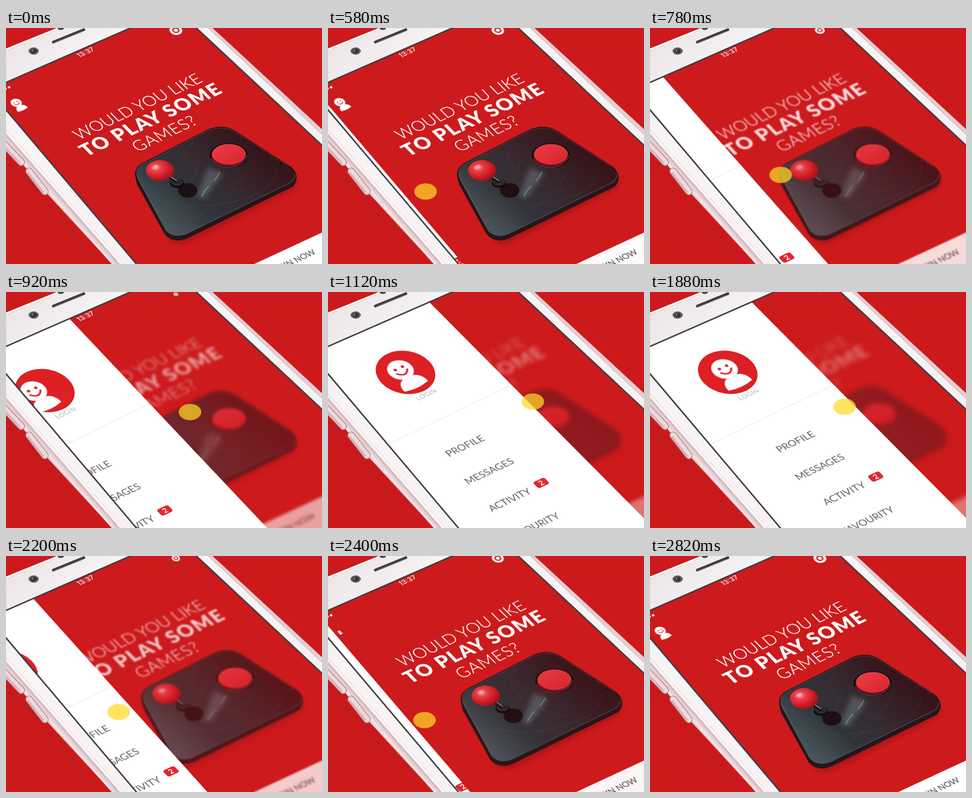
These frames come from a looping animation (560x420 px, 2.84 s). An HTML page:

```html
<!DOCTYPE html>
<html lang="en">
<head>
<meta charset="utf-8">
<title>Side menu</title>
<style>
html, body { margin: 0; width: 100%; height: 100%; overflow: hidden; background: #cc1a1c; }
#stage { position: relative; width: 560px; height: 420px; overflow: hidden; }
svg { position: absolute; left: 0; top: 0; width: 560px; height: 420px; }
text { font-family: Lato, "Open Sans", sans-serif; text-anchor: middle; }

/* lays flat artwork on the tilted screen */
.flat { transform: translate(var(--x), var(--y)) matrix(.91, -.43, .7, .72, 0, 0); }

.anim { animation: 2840ms cubic-bezier(.65, 0, .35, 1) infinite; }
.panel { animation-name: edge; }
.slide { animation-name: slide; --dx: -226px; --dy: 107px; }
.face { animation-name: face; --dx: -226px; --dy: 107px; }
.item { animation-name: item; --dx: -183px; --dy: 91px; }
.late { animation-name: late; --dx: -181px; --dy: 92px; }
.fade { animation-name: fade; }
.shift { animation-name: shift; }
.gear { animation-name: shrink; transform-origin: 301px 4px; }
.user { animation-name: user; transform-origin: 21px 136px; }
.drag { animation-name: drag; }
.touch { animation-name: touch; }

@keyframes edge {
  0%, 15.28%, 92.46%, 100% { clip-path: polygon(-32px 109px, -32px 109px, 490px 728px, 490px 728px); }
  46.27%, 59.01% { clip-path: polygon(-32px 109px, 191px 13px, 776.6px 600.3px, 490px 728px); }
}
@keyframes slide {
  0%, 15.28%, 92.46%, 100% { transform: translate(var(--dx), var(--dy)); }
  46.27%, 59.01% { transform: translate(0, 0); }
}
@keyframes face {
  0%, 16.02%, 92.46%, 100% { transform: translate(var(--dx), var(--dy)); }
  47.01%, 59.01% { transform: translate(0, 0); }
}
@keyframes item {
  0%, 18.38%, 92.46%, 100% { transform: translate(var(--dx), var(--dy)); }
  49.37%, 59.01% { transform: translate(0, 0); }
}
@keyframes late {
  0%, 19.37%, 92.46%, 100% { transform: translate(var(--dx), var(--dy)); }
  50.35%, 59.01% { transform: translate(0, 0); }
}
@keyframes fade {
  0%, 15.28%, 92.46%, 100% { filter: blur(0); opacity: 1; }
  46.27%, 59.01% { filter: blur(4.2px); opacity: .36; }
}
@keyframes shift {
  0%, 30.99%, 92.46%, 100% { transform: translate(0, 0); }
  49.3%, 77.46% { transform: translate(var(--dx), var(--dy)); }
}
@keyframes shrink {
  0%, 15.28%, 92.46%, 100% { transform: scale(1); }
  46.27%, 59.01% { transform: scale(0); }
}
@keyframes user {
  0%, 15.28%, 99.3%, 100% { transform: translate(0, 0) scale(1); }
  31.7%, 59% { transform: translate(20px, -9px) scale(1); }
  86% { transform: translate(0, 0) scale(.3); }
}
@keyframes drag {
  0%, 16.9%, 87.71%, 100% { transform: translate(169px, 293px); }
  41.41%, 57.68% { transform: translate(364px, 194.5px); }
}
@keyframes touch {
  0%, 7.04%, 92.96%, 100% { transform: scale(0); }
  14.79%, 87.71% { transform: scale(1); }
}
</style>
</head>
<body>
<div id="stage">

<svg viewBox="0 0 560 420">
  <defs>
    <clipPath id="screen"><path d="M-30 110L300 -35L780 415L780 620L420 644Z"/></clipPath>
    <linearGradient id="bezel" x1="0" y1="0" x2="1" y2=".8">
      <stop offset="0" stop-color="#e9e2e4"/><stop offset=".25" stop-color="#f8f5f6"/><stop offset="1" stop-color="#f6eff1"/>
    </linearGradient>
    <linearGradient id="box" gradientUnits="userSpaceOnUse" x1="285" y1="350" x2="420" y2="195">
      <stop offset="0" stop-color="#46545a"/><stop offset=".3" stop-color="#30353b"/>
      <stop offset=".65" stop-color="#35282e"/><stop offset="1" stop-color="#35151b"/>
    </linearGradient>
    <radialGradient id="ball" cx=".36" cy=".36" r=".75">
      <stop offset="0" stop-color="#fba0a4"/><stop offset=".25" stop-color="#e8404a"/>
      <stop offset=".65" stop-color="#cb1a22"/><stop offset="1" stop-color="#8c1017"/>
    </radialGradient>
    <linearGradient id="cap" x1="0" y1="0" x2="1" y2="1">
      <stop offset="0" stop-color="#ea3e48"/><stop offset="1" stop-color="#d8242e"/>
    </linearGradient>
    <filter id="soft" x="-40%" y="-40%" width="180%" height="180%"><feGaussianBlur stdDeviation="5"/></filter>
    <g id="person">
      <path d="M-23 32Q-23 9 0 9Q23 9 23 32Q0 39 -23 32Z" fill="#fff"/>
      <circle cy="-8" r="20.5" fill="#fff" stroke="#e9d4d5" stroke-width=".8"/>
      <g fill="#dc2024"><circle cx="-7" cy="-12" r="2.7"/><circle cx="7" cy="-12" r="2.7"/></g>
      <path d="M-10 -4Q0 9 10 -4" fill="none" stroke="#dc2024" stroke-width="3.2" stroke-linecap="round"/>
    </g>
  </defs>

  <rect width="560" height="420" fill="#cc1a1c"/>

  <!-- phone body -->
  <path d="M-20 215L75 318L170 430" fill="none" stroke="#8d1014" stroke-width="10" opacity=".12" filter="url(#soft)"/>
  <path d="M0 37L92 0H366L560 180V420H188L75 297L0 207Z" fill="#e6cfd2"/>
  <path d="M0 41L100 0H358L560 190V420H208L0 180Z" fill="url(#bezel)"/>
  <path d="M0 184L205 420M0 38L94 0" fill="none" stroke="#fff" stroke-width="3"/>
  <path d="M0 191L199 420" stroke="#c5adb2" stroke-width="1.5"/>
  <path d="M0 204L190 420" stroke="#f3e3e5" stroke-width="4"/>
  <path d="M359 0L560 189" stroke="#d9c1c5" stroke-width="1.5"/>
  <g fill="none" stroke-linecap="round">
    <path d="M-4 206L27 239M41 255L69 291" stroke="#a9858b" stroke-width="13"/>
    <path d="M-4 206L27 239M41 255L69 291" stroke="#eed8db" stroke-width="10.5"/>
    <path d="M-4 210L24 240M39 258L66 292" stroke="#d3b2b7" stroke-width="3"/>
    <path d="M84 25L138 3" stroke="#413c3f" stroke-width="5"/>
    <path d="M86 26L138 5" stroke="#777174" stroke-width="1"/>
  </g>
  <ellipse cx="97" cy="-1" rx="6" ry="4.5" fill="#45464b"/>
  <ellipse cx="49" cy="41" rx="9" ry="6.5" fill="#5e6065"/>
  <ellipse cx="49" cy="41" rx="5.5" ry="4" fill="#303238"/>
  <circle cx="47" cy="40" r="1.5" fill="#8f97a0"/>

  <!-- home screen -->
  <g clip-path="url(#screen)">
    <rect x="-40" y="-40" width="680" height="500" fill="#cd1a1c"/>
    <g class="anim fade">
      <path d="M440 420L560 364L640 327V480H440Z" fill="#fff"/>
      <g class="flat" style="--x:550.5px;--y:401px"><text font-size="15" fill="#6d6b70" stroke="#6d6b70" stroke-width=".35" style="text-anchor:end">BEGIN NOW</text></g>

      <g class="anim shift" style="--dx:5px;--dy:-3px" fill="#fff">
        <g class="flat" style="--x:240px;--y:147px"><text font-size="29" font-weight="300" stroke="#fff" stroke-width=".35">WOULD YOU LIKE</text></g>
        <g class="flat" style="--x:265px;--y:171.5px"><text font-size="34.3" font-weight="900" letter-spacing="1.8">TO PLAY SOME</text></g>
        <g class="flat" style="--x:288px;--y:195px"><text font-size="29.5" font-weight="300" letter-spacing="1" stroke="#fff" stroke-width=".35">GAMES?</text></g>
      </g>

      <g class="anim shift" style="--dx:11px;--dy:-8px">
        <path d="M290 373L512 262Q521 278 500 291L325 379Q302 388 290 373Z" fill="#6d0c10" opacity=".4" filter="url(#soft)"/>
        <path d="M229 264Q226 247 246 238L357 181Q384 169 406 183L505 247Q523 263 509 282L322 374Q296 385 281 367L232 278Z" fill="#25161b"/>
        <path d="M231 258Q230 247 247 239L358 182Q384 171 405 184L503 248Q519 261 504 275L320 366Q296 375 283 359L234 270Z" fill="url(#box)"/>
        <path d="M231 261L283 359Q296 375 320 366L504 275Q513 268 512 260" fill="none" stroke="#77777d" stroke-width="1.2" opacity=".55"/>
        <path d="M236 246L358 183Q384 172 405 185L500 246" fill="none" stroke="#6c5c62" stroke-width="1" opacity=".5"/>
        <g fill="none" stroke="#8b9298" opacity=".13">
          <path d="M262 293Q300 330 390 312T480 250M275 325Q330 290 342 235M300 350Q380 330 425 255M330 205Q300 235 345 262T420 290"/>
        </g>
        <path d="M358 248L384 259L352 303L338 300Z" fill="#7c979d" opacity=".4" filter="url(#soft)"/>
        <path d="M379 256Q374 266 369 272M360 281Q352 288 347 300" fill="none" stroke="#b9cdd1" stroke-width="2" opacity=".35"/>
        <circle cx="487" cy="241" r="2" fill="#111"/>

        <ellipse cx="322" cy="289" rx="17" ry="13" fill="#1a0a0e" opacity=".85"/>
        <ellipse cx="303" cy="276" rx="12.5" ry="8.5" fill="#0f0c10"/>
        <ellipse cx="303" cy="274" rx="10" ry="6" fill="#29262b" stroke="#56545a" stroke-width=".7"/>
        <path d="M288 264L303 274" stroke="#171318" stroke-width="5"/>
        <path d="M291 264L303 272" stroke="#a9a5a8" stroke-width="1.5"/>
        <ellipse cx="273" cy="253.5" rx="25" ry="18.5" fill="url(#ball)"/>
        <ellipse cx="264" cy="247" rx="6" ry="3" fill="#fff" opacity=".28" transform="rotate(-25 264 247)"/>

        <ellipse cx="395" cy="227" rx="34" ry="22" fill="#150b0f"/>
        <path d="M363 233Q373 249 397 248Q422 245 428 226" fill="none" stroke="#69666b" stroke-width="1"/>
        <ellipse cx="394" cy="228" rx="30" ry="18" fill="#8e1017"/>
        <ellipse cx="395" cy="224.5" rx="29.5" ry="17.5" fill="url(#cap)" stroke="#f0565a" stroke-width=".8"/>
      </g>
    </g>

    <g class="flat" style="--x:144px;--y:46.5px"><text font-size="12" font-weight="500" fill="#fff" style="font-family:Inter,'Liberation Sans',sans-serif">13:37</text></g>
    <g fill="#fff"><ellipse cx="-1" cy="108" rx="2.5" ry="2"/><ellipse cx="5.5" cy="105.5" rx="2.5" ry="2"/></g>
    <g class="anim gear">
      <g class="flat" style="--x:301px;--y:4px">
        <circle r="10" fill="#fff"/><circle r="4.6" fill="none" stroke="#cd1a1c" stroke-width="2.4"/>
      </g>
    </g>
    <g class="anim user">
      <g class="flat" style="--x:20.5px;--y:135.5px"><use href="#person" transform="scale(.42)"/></g>
    </g>
  </g>
</svg>

<!-- side menu -->
<svg class="anim panel" viewBox="0 0 560 420">
  <g clip-path="url(#screen)">
    <rect x="-40" y="-40" width="680" height="500" fill="#fff"/>
    <path d="M107 271L420 119" stroke="#ebebeb" stroke-width="1.2"/>
    <g class="anim slide">
      <g class="flat" style="--x:149px;--y:137.5px"><circle r="46" fill="#dc2024"/></g>
      <g class="flat" style="--x:189px;--y:180px"><text font-size="11.5" letter-spacing=".5" fill="#b3b3b3">LOGIN</text></g>
    </g>
    <g class="anim face">
      <g class="flat" style="--x:149px;--y:137.5px"><use href="#person"/></g>
    </g>
    <g font-size="18" fill="#5f5f62">
      <g class="anim item"><g class="flat" style="--x:271.4px;--y:266.5px"><text>PROFILE</text></g></g>
      <g class="anim item"><g class="flat" style="--x:314.4px;--y:311.5px"><text>MESSAGES</text></g></g>
      <g class="anim late">
        <g class="flat" style="--x:357.4px;--y:358.5px"><text>ACTIVITY</text></g>
        <g class="flat" style="--x:409px;--y:324px">
          <rect x="-11" y="-7.5" width="22" height="15" rx="4" fill="#e3262d"/>
          <text y="4.8" font-size="13.5" font-weight="700" fill="#fff">2</text>
        </g>
      </g>
      <g class="anim late"><g class="flat" style="--x:399.4px;--y:406.5px"><text>FAVOURITY</text></g></g>
    </g>
  </g>
</svg>

<svg viewBox="0 0 560 420">
  <path d="M-30 110L300 -35L780 415M-30 110L280 478" fill="none" stroke="#3f3d40" stroke-width="2.6"/>
  <g class="anim drag"><g class="anim touch">
    <ellipse rx="20" ry="14.5" fill="#ffda26" opacity=".725"/>
  </g></g>
</svg>

</div>
</body>
</html>
```
